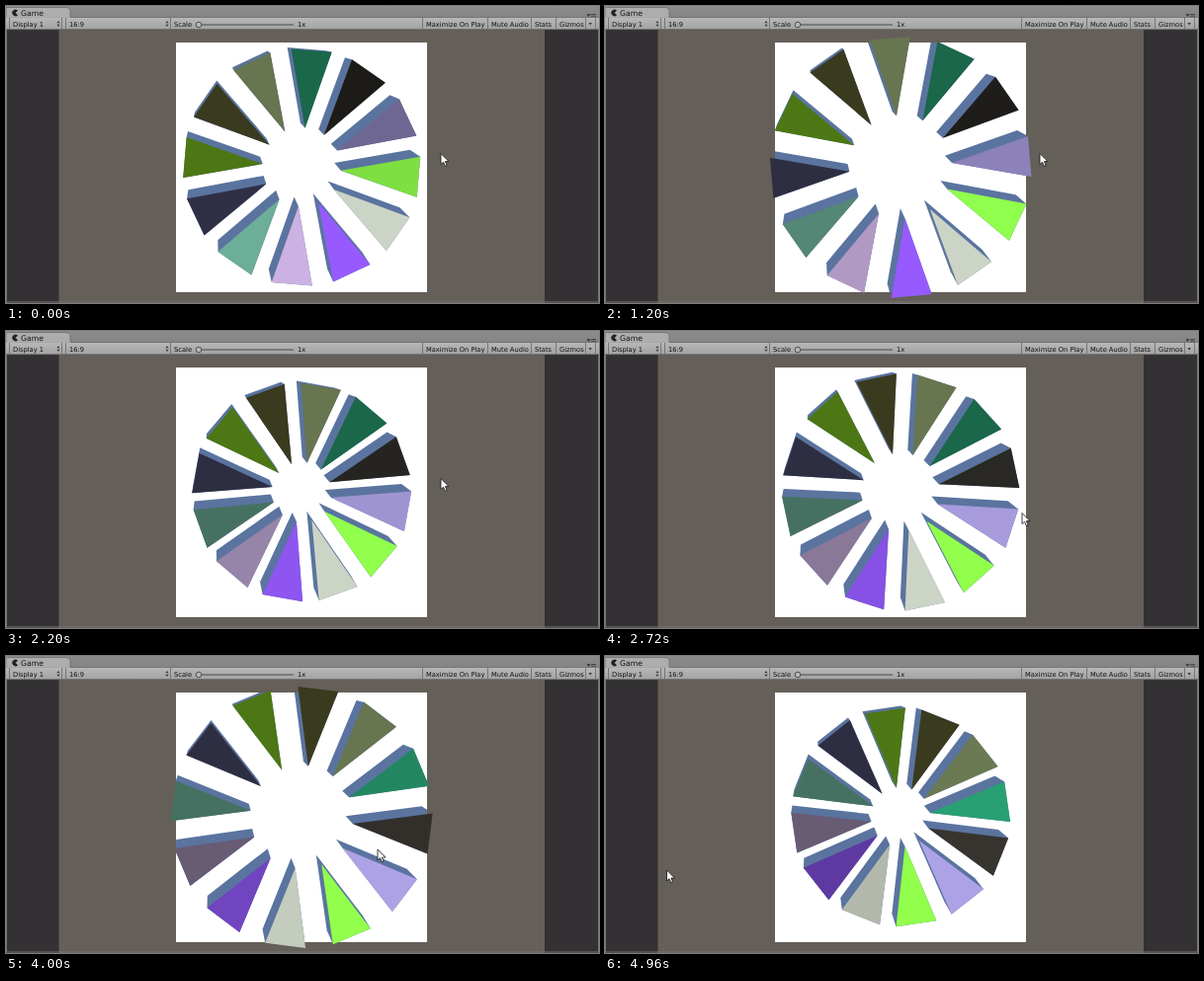
Recreate the animation shown at these times as an HTML page. Size 600 by 301 pixels, loop 5 s.

```html
<!DOCTYPE html>
<html lang="en">
<head>
<meta charset="utf-8">
<title>Game view</title>
<style>
  html, body { margin: 0; width: 100%; height: 100%; overflow: hidden; background: #333133; }
  svg { display: block; width: 100%; height: 100%; }
  text { font: 6.7px "DejaVu Sans", sans-serif; fill: #111; }
  .tab { font-size: 7.7px; }
  .sep { stroke: #767676; fill: none; }
  .arrow { fill: #3a3a3a; }
</style>
</head>
<body>
<svg viewBox="0 0 600 301">
  <defs>
    <linearGradient id="tabs" x2="0" y2="1">
      <stop stop-color="#8c8c8c"/><stop offset="1" stop-color="#848484"/>
    </linearGradient>
    <linearGradient id="bar" x2="0" y2="1">
      <stop stop-color="#b8b8b8"/><stop offset="1" stop-color="#a2a2a2"/>
    </linearGradient>
    <clipPath id="board"><rect x="172" y="37" width="254" height="253"/></clipPath>
    <path id="updown" class="arrow" d="M-1.6 -.7L0 -3 1.6 -.7zM-1.6 .7L0 3 1.6 .7z"/>
  </defs>

  <rect width="600" height="301" fill="#333133"/>
  <rect x="53.5" y="24" width="491.5" height="277" fill="#655f59"/>
  <rect x="172" y="37" width="254" height="253" fill="#fff"/>
  <path d="M.5 24V300M599.5 24V300M0 300H600" stroke="#77736f" fill="none"/>

  <g id="shadows" fill="#5a749f" clip-path="url(#board)"></g>
  <g id="wedges"></g>

  <rect width="600" height="12" fill="url(#tabs)"/>
  <path d="M0 12V2.5Q0 1.5 2 1.5H61Q64 1.5 65 4V12z" fill="#adadad" stroke="#686868" stroke-width=".7"/>
  <rect y="11.5" width="600" height="12.5" fill="url(#bar)"/>
  <path d="M65 11.5H600" stroke="#6c6c6c" stroke-width=".8"/>
  <path d="M0 23.7H600" stroke="#5c5c5c" stroke-width=".8"/>
  <path d="M12 4.6A3.3 3.3 0 1 0 12 9.2L9.6 6.9z" fill="#222"/>
  <text class="tab" x="15" y="9.7">Game</text>
  <path d="M592 8.5h5M592 10.2h5M588 8.4h3l-1.5 2z" stroke="#3a3a3a" stroke-width=".8" fill="#3a3a3a"/>

  <path class="sep" d="M3.5 12V23M56.5 12V23M60.5 12V23M166.5 12V23M421.5 12V23M487.5 12V23M531.5 12V23M556.5 12V23M586.5 12V23M596.5 12V23"/>
  <text x="7" y="20.6">Display 1</text>
  <use href="#updown" x="53" y="18"/>
  <text x="64" y="20.6">16:9</text>
  <use href="#updown" x="163" y="18"/>
  <text x="170" y="21">Scale</text>
  <path d="M193 19H291" stroke="#4a4a4a" stroke-width="1.2"/>
  <circle cx="195" cy="19" r="2.8" fill="#b8b8b8" stroke="#444" stroke-width=".9"/>
  <text x="295" y="21">1x</text>
  <text x="425" y="20.6">Maximize On Play</text>
  <text x="491" y="20.6">Mute Audio</text>
  <text x="535" y="20.6">Stats</text>
  <text x="560" y="20.6">Gizmos</text>
  <path class="arrow" d="M589.5 17h3.4l-1.7 2.4z"/>

  <path id="cursor" d="M0 0V11L2.5 8.7 4.3 12.8 6.1 12 4.4 8.1H8z" fill="#fff" stroke="#111" stroke-width=".8"/>
</svg>
<script>
const LOOP = 5000, STEP = 40;
const CX = 299.2, CY = 163.4, LENGTH = 79, HALF = 20.6;
const RAD = Math.PI / 180;

// Fully lit colours, clockwise from the lime wedge
const COLORS = [
  [145, 255, 76], [204, 212, 198], [150, 90, 255], [208, 182, 232],
  [140, 226, 196], [92, 92, 134], [152, 238, 40], [116, 116, 62],
  [206, 234, 160], [52, 206, 148], [56, 53, 48], [174, 162, 230]
];

// Keys: [time, wheel angle, pulse phase], in degrees
const WHEEL = [[0, 4.8, -108], [680, 17.4, -11.6], [LOOP, 82.3, 543.9]];
// Keys: [time, x, y]
const POINTER = [
  [0, 440, 149.5], [2200, 440, 149.5], [2680, 422, 184.5], [2880, 422, 184.5],
  [3320, 376, 196], [4480, 376, 196], [4880, 62.5, 217], [LOOP, 62.5, 217]
];

function sample(keys, t) {
  const i = Math.max(1, keys.findIndex(k => k[0] >= t));
  const a = keys[i - 1], b = keys[i];
  const u = (t - a[0]) / (b[0] - a[0]);
  return a.slice(1).map((v, j) => v + (b[j + 1] - v) * u);
}

function hull(points) {
  const sorted = [...points].sort((a, b) => a[0] - b[0] || a[1] - b[1]);
  const chain = list => {
    const out = [];
    for (const p of list) {
      while (out.length > 1) {
        const [a, b] = out.slice(-2);
        if ((b[0] - a[0]) * (p[1] - a[1]) - (b[1] - a[1]) * (p[0] - a[0]) > 0) break;
        out.pop();
      }
      out.push(p);
    }
    return out.slice(0, -1);
  };
  return [...chain(sorted), ...chain(sorted.reverse())];
}

// Wedge corners relative to the centre
function corners(angle, radius) {
  const c = Math.cos(angle), s = Math.sin(angle);
  return [[radius - LENGTH, 0], [radius, -HALF], [radius, HALF]]
    .map(([x, y]) => [x * c - y * s, x * s + y * c]);
}

const place = ([x, y]) => [CX + x, CY + y];
const cast = ([x, y]) => [CX - 4.5 + x * .95, CY - 7.5 + y * .95];
const format = points => points.map(p => p.map(v => v.toFixed(2))).join(" ");

// Soft light from the lower right
const shade = degrees =>
  Math.min(1, .5 + .5 * Math.max(0, Math.cos((degrees - 58) * RAD) + .15));

function addPolygons(id) {
  const group = document.getElementById(id);
  return COLORS.map(() =>
    group.appendChild(document.createElementNS("http://www.w3.org/2000/svg", "polygon")));
}

const shadows = addPolygons("shadows");
const wedges = addPolygons("wedges");
const cursor = document.getElementById("cursor");

function draw(t) {
  const [spin, phase] = sample(WHEEL, t);
  const radius = 123 + 14 * Math.cos(phase * RAD);
  COLORS.forEach((color, i) => {
    const degrees = spin + i * 30;
    const shape = corners(degrees * RAD, radius);
    const face = shape.map(place);
    const light = shade(degrees);
    wedges[i].setAttribute("points", format(face));
    wedges[i].setAttribute("fill", `rgb(${color.map(v => Math.round(v * light))})`);
    shadows[i].setAttribute("points", format(hull([...face, ...shape.map(cast)])));
  });
  cursor.setAttribute("transform", `translate(${sample(POINTER, t)})`);
}

const start = performance.now();
function tick() {
  const t = Math.floor((performance.now() - start) % LOOP / STEP) * STEP;
  draw(t < 2 * STEP ? 0 : t);
  requestAnimationFrame(tick);
}
tick();
</script>
</body>
</html>
```
